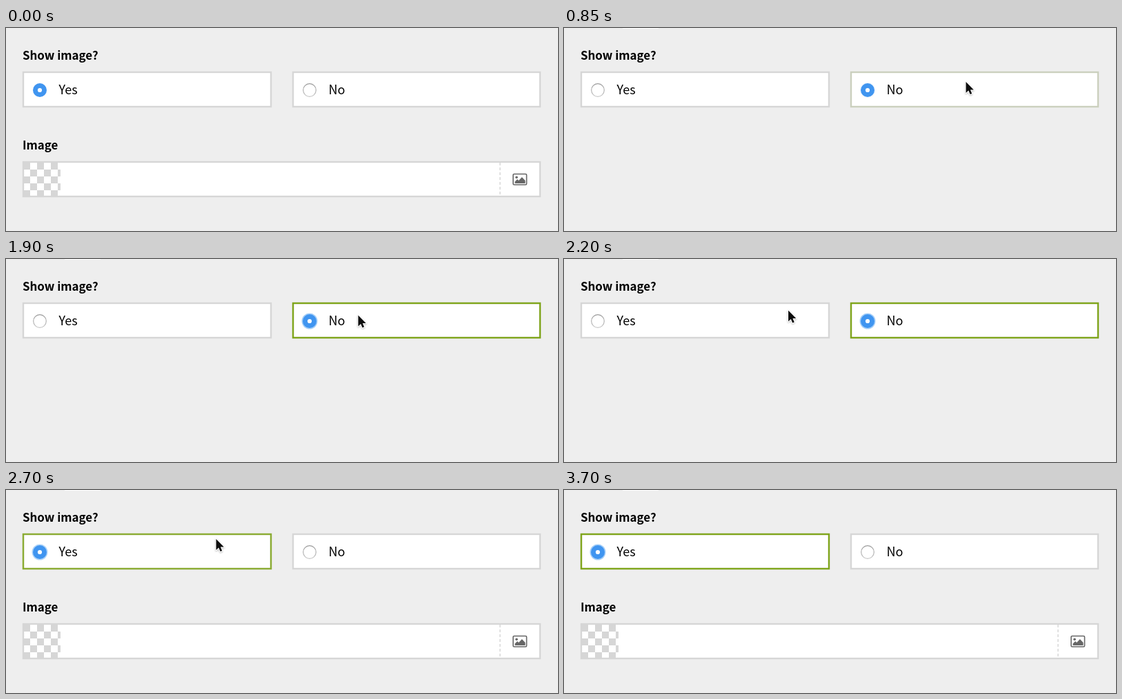
An HTML page that plays this animation: 800 by 294 pixels, repeating every 3750 ms.

```html
<!DOCTYPE html>
<html lang="en">
<head>
<meta charset="utf-8">
<title>Show image toggle</title>
<style>
  html, body { margin: 0; width: 100%; height: 100%; overflow: hidden; background: #eee; }
  svg { display: block; }
  text { font: 18px "Noto Sans CJK JP", "Noto Sans CJK SC", "Noto Sans CJK", "Noto Sans", sans-serif; fill: #000; }
  .label { font-size: 16.9px; font-weight: 600; }
  .box { fill: #fff; stroke: #d6d6d6; stroke-width: 2.4; }
</style>
</head>
<body>
<svg width="800" height="294" viewBox="0 0 800 294">
  <defs>
    <pattern id="checks" x="25" y="195" width="20" height="20" patternUnits="userSpaceOnUse">
      <path d="M0 0h10v20h10v-10H0z" fill="#d6d6d6"/>
    </pattern>
    <linearGradient id="rim" x2="0" y2="1">
      <stop stop-color="#999"/><stop offset="1" stop-color="#c8c8c8"/>
    </linearGradient>
    <filter id="shadow" x="-50%" y="-50%" width="200%" height="200%">
      <feDropShadow dx="0" dy="1" stdDeviation="1" flood-opacity=".3"/>
    </filter>
  </defs>
  <rect width="800" height="294" fill="#eee"/>
  <rect id="strip" x="85" width="52" height="1" fill="#fff"/>

  <text class="label" x="24" y="46">Show image?</text>
  <g id="yes"></g>
  <g id="no"></g>

  <g id="field">
    <text class="label" x="24" y="176">Image</text>
    <rect class="box" x="25" y="194" width="749" height="50"/>
    <rect x="25" y="195" width="54" height="48" fill="url(#checks)"/>
    <path d="M716 195v48" stroke="#d8d8d8" stroke-width="1.5" stroke-dasharray="4 3"/>
    <rect x="735" y="211.5" width="19.5" height="15.5" rx="1.5" fill="#fff" stroke="#666" stroke-width="1.6"/>
    <circle cx="740" cy="216.3" r="1.8" fill="#666"/>
    <path d="M737.5 225v-2.5l3.5-3.5 2 2 4.8-5 4.7 5v4z" fill="#666"/>
  </g>

  <path id="cursor" d="M0 0V16L3.7 12.6 6.1 18 8.7 16.9 6.4 11.6H11.3Z" fill="#111"
    stroke="#fff" stroke-width="2" stroke-linejoin="round" paint-order="stroke" filter="url(#shadow)"/>
</svg>
<script>
const LOOP = 3750, STEP = 50, FADE = 200;
const ENTER = 300, SLIDE = 1700, LEAVE = 3000, GONE = 3400;
const PRESS_NO = 650, PICK_NO = 850, PRESS_YES = 2350, PICK_YES = 2550;
const $ = id => document.getElementById(id);
const clamp = v => Math.max(0, Math.min(1, v));

const easeOut = u => 1 - (1 - u) ** 3;
const easeInOut = u => u * u * (3 - 2 * u);
const easeIn = u => u ** 1.5;

// Moves along a line that sags downwards by `sag` pixels
function glide(u, ease, [x0, y0], [x1, y1], sag) {
  const k = ease(clamp(u));
  return [x0 + (x1 - x0) * k, y0 + (y1 - y0) * k + sag * Math.sin(Math.PI * clamp(u))];
}

function cursorAt(t) {
  const below = [719.5, 272], overNo = [582.5, 78], overYes = [304.5, 71], outside = [848, 196];
  if (t < SLIDE) return glide((t - ENTER) / 500, easeOut, below, overNo, 0);
  if (t < LEAVE) return glide((t - SLIDE) / 600, easeInOut, overNo, overYes, 6);
  return glide((t - LEAVE) / (GONE - LEAVE), easeIn, overYes, outside, 8);
}

function makeOption(id, x, width, text) {
  const dot = `cx="${x + 24}" cy="90"`;
  const box = `x="${x}" y="64" width="${width}" height="50"`;
  $(id).innerHTML = `
    <rect class="box" ${box}/>
    <rect class="focus" ${box} fill="none" stroke="#80a61c" stroke-width="2.4"/>
    <circle class="focus" ${dot} r="11.5" fill="#a5cff8"/>
    <circle class="off" ${dot} r="9.3" stroke-width="1.2"/>
    <g class="on"><circle ${dot} r="10" fill="#4095f0"/><circle ${dot} r="3.1" fill="#fff"/></g>
    <text x="${x + 51.5}" y="96">${text}</text>`;
}

function setOption(id, checked, pressed, focus) {
  const set = (name, key, value) =>
    $(id).querySelectorAll(name).forEach(el => el.setAttribute(key, value));
  set(".focus", "opacity", focus);
  set(".on", "opacity", checked ? 1 : 0);
  set(".off", "opacity", checked ? 0 : 1);
  set(".off", "fill", pressed ? "#ebebeb" : "#fff");
  set(".off", "stroke", pressed ? "#999" : "url(#rim)");
}

function show(id, visible) {
  $(id).setAttribute("visibility", visible ? "visible" : "hidden");
}

function draw(t) {
  const within = (from, to) => t >= from && t < to;
  const fade = from => t < from ? 0 : clamp((t - from + STEP / 2) / FADE);
  const noChecked = within(PICK_NO, PICK_YES);
  setOption("yes", !noChecked, within(PRESS_YES, PICK_YES), fade(PICK_YES));
  setOption("no", noChecked, within(PRESS_NO, PICK_NO), fade(PICK_NO) * (1 - fade(PRESS_YES - 2 * STEP)));
  show("field", !noChecked);
  show("strip", t >= ENTER);
  show("cursor", within(ENTER, GONE));
  $("cursor").setAttribute("transform", `translate(${cursorAt(t)})`);
}

makeOption("yes", 25, 359, "Yes");
makeOption("no", 416, 358, "No");

const start = performance.now();
function tick() {
  const t = (performance.now() - start) % LOOP;
  draw(Math.floor(t / STEP) * STEP);
  requestAnimationFrame(tick);
}
tick();
</script>
</body>
</html>
```
